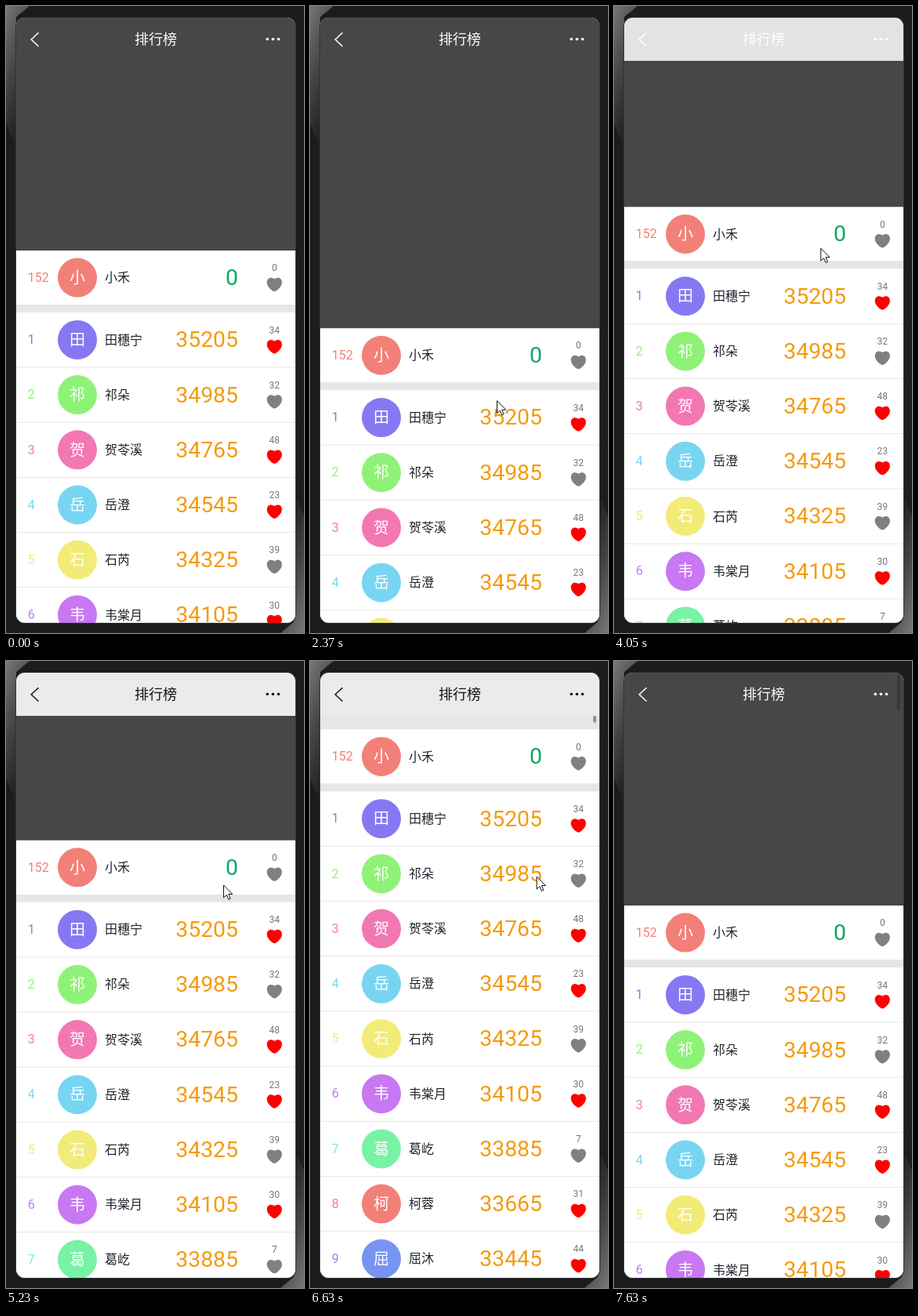
Write an HTML page that moves like this. It is 380 px wide and 800 px high and loops after 7790 ms.

```html
<!DOCTYPE html>
<html lang="zh-CN">
<head>
<meta charset="utf-8">
<title>排行榜</title>
<style>
  html, body { margin: 0; width: 100%; height: 100%; overflow: hidden; background: #1c1c1c; }
  svg { display: block; width: 380px; height: 800px; }
  text { font-family: Roboto, sans-serif; }
  .cjk { font-family: "Noto Sans CJK SC", "Noto Sans CJK", sans-serif; }
  .rank { font-size: 16px; }
  .name { font-size: 16px; fill: #20242c; }
  .face { font-size: 20px; fill: #fff; text-anchor: middle; }
  .score { font-size: 28.4px; fill: #f59a0c; text-anchor: end; }
  .mine .score { fill: #06a865; }
  .likes { font-size: 12px; fill: #777; text-anchor: middle; }
  .title { font-size: 18px; font-weight: 500; text-anchor: middle; }
</style>
</head>
<body>
<svg viewBox="0 0 380 800">
  <defs>
    <clipPath id="screen"><rect x="13" y="15" width="356" height="772" rx="11"/></clipPath>
    <linearGradient id="shine" x1="0" y1="0" x2=".4" y2="1">
      <stop offset="0" stop-color="#777"/><stop offset=".5" stop-color="#444"/><stop offset="1" stop-color="#1c1c1c"/>
    </linearGradient>
    <path id="corner" d="M0 0H30L13 14V180L0 150Z" fill="url(#shine)"/>
    <path id="heart" d="M0 8.8C-2.6 8.8-9.6 3-9.6-2.6C-9.6-6.4-7.2-8.6-4.7-8.6C-2.6-8.6-1-7.9 0-6.8C1-7.9 2.6-8.6 4.7-8.6C7.2-8.6 9.6-6.4 9.6-2.6C9.6 3 2.6 8.8 0 8.8Z"/>
  </defs>

  <rect width="380" height="800" fill="#1c1c1c"/>
  <use href="#corner"/>
  <use href="#corner" transform="rotate(180 190 400)"/>
  <rect x="12" y="14" width="358" height="774" rx="12" fill="#303434"/>

  <g clip-path="url(#screen)">
    <rect x="13" y="15" width="356" height="772" fill="#e6e6e6"/>
    <rect id="banner" x="13" width="356" fill="#474747"/>
    <g id="list">
      <rect x="13" y="312" width="356" height="69.4" fill="#fff"/>
      <rect x="13" y="381.2" width="356" height="10" fill="#e6e6e6"/>
      <rect x="13" y="391" width="356" height="1200" fill="#fff"/>
    </g>
    <rect id="thumb" x="361" width="4" rx="2" fill="#182431"/>
    <rect id="bar" x="13" y="15" width="356" height="55" fill="#ebebeb"/>
    <g id="head">
      <path d="M41.5 34L32.2 42.7L41.5 51.5" fill="none" stroke="currentColor" stroke-width="1.5"/>
      <text class="cjk title" x="191" y="49" fill="currentColor">排行榜</text>
      <g fill="currentColor">
        <circle cx="333.3" cy="42.3" r="1.8"/><circle cx="340.4" cy="42.3" r="1.8"/><circle cx="347.5" cy="42.3" r="1.8"/>
      </g>
    </g>
  </g>

  <path id="cursor" d="M.5 .5V16.5L4.2 13L6.8 18.8L9.2 17.7L6.7 12H11.8Z" fill="#fff" stroke="#111"/>
</svg>
<script>
const LOOP = 7790, PITCH = 70.2;
const $ = id => document.getElementById(id);

// name, likes, and a heart if liked
const people = `田穗宁 34 ♥,祁朵 32,贺苓溪 48 ♥,岳澄 23 ♥,石芮 39,韦棠月 30 ♥,葛屹 7,
柯蓉 31 ♥,屈沐 44 ♥,尤荔 1,聂湘 28,符崧 42 ♥,蒲岑 17`.split(",").map(s => s.trim().split(" "));

function row(rank, [name, likes, liked], score, y) {
  const color = `hsl(${(24 + 222.5 * rank) % 360},82%,71%)`;
  return `<g transform="translate(0 ${y})">
    <text class="rank" x="27.8" y="5.2" fill="${color}">${rank}</text>
    <circle cx="91" r="25" fill="${color}"/>
    <text class="cjk face" x="91" y="7.2">${name[0]}</text>
    <text class="cjk name" x="126" y="5.6">${name}</text>
    <text class="score" x="296" y="9.4">${score}</text>
    <text class="likes" x="342.3" y="-8.4">${likes}</text>
    <use href="#heart" x="342.3" y="8.7" fill="${liked ? "#f00" : "#808080"}"/>
    <rect x="13" y="34.6" width="356" height="1" fill="#e6e6e6"/>
  </g>`;
}

$("list").insertAdjacentHTML("beforeend",
  `<g class="mine">${row(152, ["小禾", 0], 0, 346.6)}</g>` +
  people.map((p, i) => row(i + 1, p, 35205 - 220 * i, 425.9 + PITCH * i)).join(""));

// Monotone cubic curve through [time, value] points
function curve(...pts) {
  const n = pts.length - 1;
  const slope = i => (pts[i + 1][1] - pts[i][1]) / (pts[i + 1][0] - pts[i][0]);
  const tangent = i => {
    if (i === 0 || i === n) return 0;
    const a = slope(i - 1), b = slope(i);
    return a * b > 0 ? 2 * a * b / (a + b) : 0;
  };
  return t => {
    if (t <= pts[0][0]) return pts[0][1];
    if (t >= pts[n][0]) return pts[n][1];
    let i = 0;
    while (t > pts[i + 1][0]) i++;
    const [t0, v0] = pts[i], [t1, v1] = pts[i + 1];
    const d = t1 - t0, u = (t - t0) / d, w = 1 - u;
    return v0 * (1 + 2 * u) * w * w + tangent(i) * d * u * w * w +
      v1 * u * u * (3 - 2 * u) - tangent(i + 1) * d * u * u * w;
  };
}

// pull down, drag up, fling up, drag back, spring to rest
const scroll = curve([660, 0], [1400, 110], [1500, 114], [2010, 114], [3130, 26.4], [4050, -55.6],
  [4410, -80], [5190, -80], [5950, -463.5], [6010, -463.5], [7070, -7], [7210, 28], [7600, 0]);

// The pointer enters, holds the list with rubber-band damping, then leads the fling
const pointerX = curve([60, 50], [480, 214], [1400, 222], [3130, 251], [5950, 283.5], [7070, 290]);
const enter = curve([60, 667], [480, 356]);
const leave = curve([5190, 286], [5950, 226], [6010, 226], [7070, 331], [7210, 350]);
const held = s => 356 + 0.85 * s + 0.0064 * Math.max(0, s) ** 2;
const pointerY = t => t < 660 ? enter(t) : t < 5190 ? held(scroll(t)) : leave(t);

const clamp = v => Math.max(0, Math.min(1, v));
const ramp = (t, a, b) => clamp((t - a) / (b - a));

function set(id, attrs) {
  for (const key in attrs) $(id).setAttribute(key, attrs[key]);
}

function draw(t) {
  const y = scroll(t), late = scroll(t - 40); // banner trails the list
  const ink = Math.round(255 - 235 * (ramp(t, 4080, 4180) - ramp(t, 7100, 7160)));
  set("list", { transform: `translate(0 ${y})` });
  set("banner", { height: Math.max(0, 312 + late) });
  set("bar", { opacity: clamp(-late / 55) });
  set("head", { color: `rgb(${ink},${ink},${ink})` });
  set("thumb", {
    y: 15 + Math.max(0, -y) * 0.07,
    height: Math.max(0, 48 - Math.max(0, y)),
    opacity: 0.4 * ramp(t, 660, 740)
  });
  set("cursor", {
    visibility: t >= 80 && t < 7630 ? "visible" : "hidden",
    transform: `translate(${pointerX(t)} ${pointerY(t)})`
  });
}

const start = performance.now();
function tick() {
  draw((performance.now() - start) % LOOP);
  requestAnimationFrame(tick);
}
draw(0);
requestAnimationFrame(tick);
</script>
</body>
</html>
```
